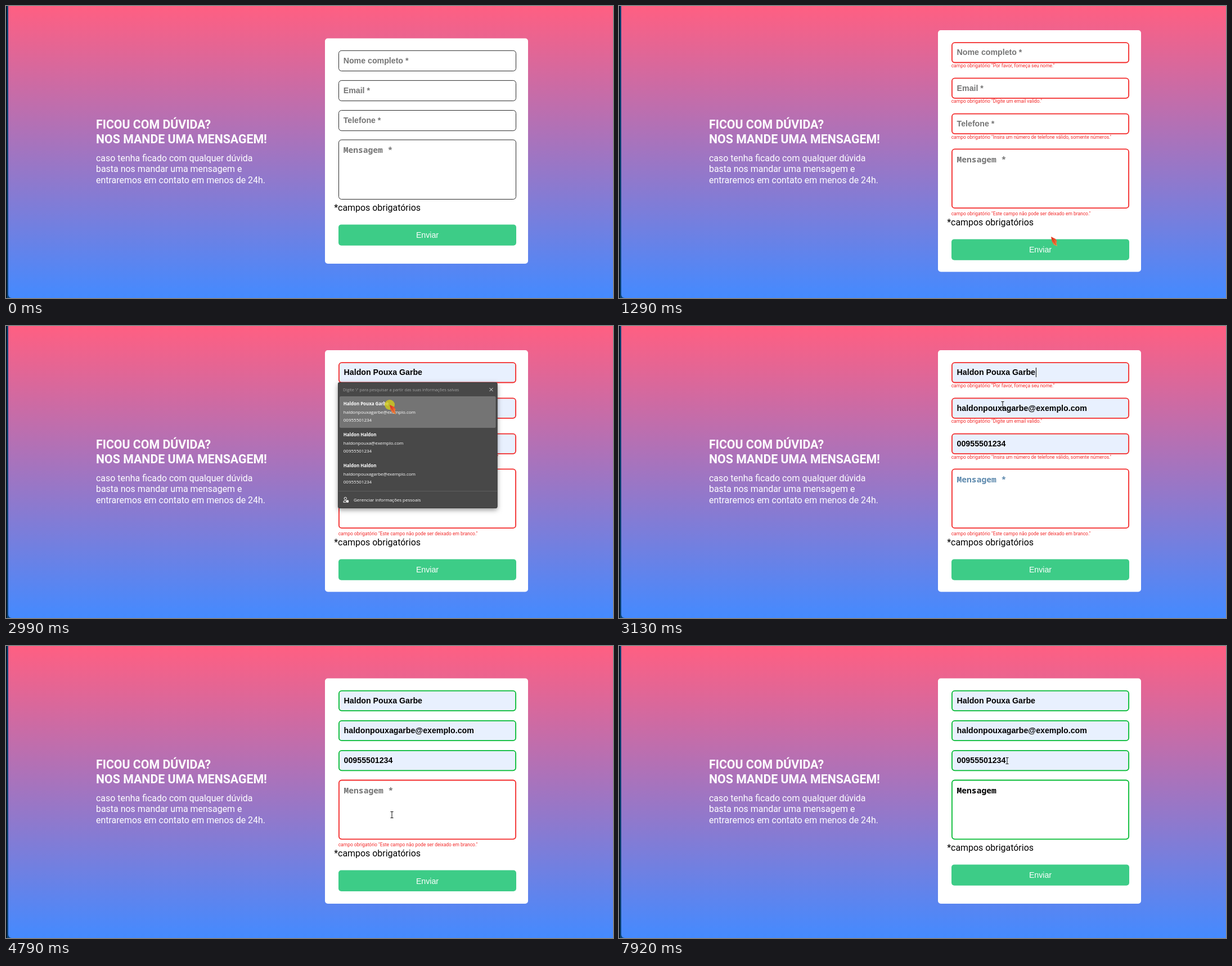
Recreate the animation shown at these times as an HTML page with a canvas. Size 1079 by 519 pixels, loop 8 s.

```html
<!DOCTYPE html>
<html lang="pt-BR">
<head>
<meta charset="utf-8">
<title>Formulário de contato</title>
<style>
html, body { margin: 0; width: 100%; height: 100%; overflow: hidden; background: #448aff; }
canvas { display: block; }
</style>
</head>
<body>
<canvas id="stage" width="1079" height="519"></canvas>
<script>
const ctx = document.getElementById('stage').getContext('2d');
const LOOP = 8000;

const ROBOTO = 'Roboto, sans-serif';
const ARIAL = '"Liberation Sans", Arial, sans-serif';
const FONT = {
  title: `bold 21.3px ${ROBOTO}`,
  body: `15.95px ${ROBOTO}`,
  error: `8.46px ${ROBOTO}`,
  input: `bold 14.18px ${ARIAL}`,
  button: `14.18px ${ARIAL}`,
  area: 'bold 14.6px "Noto Sans Mono", monospace',
  menu: '8px "Open Sans", sans-serif',
  menuBold: 'bold 7.9px "Open Sans", sans-serif',
  hint: '7.35px "Open Sans", sans-serif'
};
const RED = '#f32a2a', GREEN = '#04bb33', GRAY = '#757575', INK = '#000';

const NAME = 'Haldon Pouxa Garbe';
const MAIL = 'haldonpouxagarbe@exemplo.com';
const PHONE = '00955501234';

const FIELDS = [
  { hint: 'Nome completo *', value: NAME, error: 'Por favor, forneça seu nome.' },
  { hint: 'Email *', value: MAIL, error: 'Digite um email valido.' },
  { hint: 'Telefone *', value: PHONE, error: 'Insira um número de telefone válido, somente números.' }
];
const AREA_ERROR = 'Este campo não pode ser deixado em branco.';

// Form layouts; each holds from its start time on.
const LAYOUTS = [
  { from: 0, card: [57.5, 458], top: 78.8, pitch: 53.1, area: 237.4, note: 363.5, button: 388.4 },
  { from: 1290, card: [43, 472.5], top: 64.2, pitch: 63.3, area: 253.5, note: 389.7, button: 414.4, field: RED, text: RED },
  { from: 4310, card: [57.5, 458], top: 78.8, pitch: 53.1, area: 237.6, note: 373.9, button: 398.6, field: GREEN, text: RED },
  { from: 7020, card: [57.5, 458], top: 78.8, pitch: 53.1, area: 237.6, note: 363.5, button: 388.4, field: GREEN, text: GREEN }
];

// Pointer path: time, x, y
const PATH = [
  [470, 1019, 505], [1080, 768, 410], [1620, 768, 410], [2130, 674, 91],
  [2600, 674, 91], [2900, 682, 140], [3440, 682, 140], [3690, 800, 370],
  [3900, 822, 426], [4110, 798, 432], [4540, 798, 432], [4780, 686, 300],
  [6280, 686, 300], [6640, 746, 405], [6850, 751, 415], [7450, 751, 415],
  [7880, 690, 204]
];
const CLICKS = [[1150, 1290], [2160, 2300], [2920, 3130], [4180, 4310], [5000, 5140], [6890, 7020]];

const MENU = { open: 2300, close: 3130 };
const PASTE = 6350;

const within = (t, a, b) => t >= a && t < b;

function text(str, x, y, font, color, align = 'left') {
  ctx.font = font;
  ctx.fillStyle = color;
  ctx.textAlign = align;
  ctx.fillText(str, x, y);
}

function box(x, y, w, h, r, fill, stroke, line = 1) {
  ctx.beginPath();
  ctx.roundRect(x, y, w, h, r);
  if (fill) { ctx.fillStyle = fill; ctx.fill(); }
  if (stroke) { ctx.strokeStyle = stroke; ctx.lineWidth = line; ctx.stroke(); }
}

function rect(x, y, w, h, color) {
  ctx.fillStyle = color;
  ctx.fillRect(x, y, w, h);
}

function lines(color, width, ...segments) {
  ctx.strokeStyle = color;
  ctx.lineWidth = width;
  ctx.beginPath();
  for (const [x1, y1, x2, y2] of segments) { ctx.moveTo(x1, y1); ctx.lineTo(x2, y2); }
  ctx.stroke();
}

function drawPage() {
  rect(0, 0, 1079, 519, '#0b4275');
  rect(0, 0, 1.5, 519, '#03080f');
  const sky = ctx.createLinearGradient(0, 0, 0, 519);
  sky.addColorStop(0, '#ff5f82');
  sky.addColorStop(1, '#448aff');
  box(4, -10, 1090, 529, 6, sky);
  text('FICOU COM DÚVIDA?', 160, 218, FONT.title, '#fff');
  text('NOS MANDE UMA MENSAGEM!', 160, 243.5, FONT.title, '#fff');
  text('caso tenha ficado com qualquer dúvida', 160, 276, FONT.body, '#fff');
  text('basta nos mandar uma mensagem e', 160, 295.3, FONT.body, '#fff');
  text('entraremos em contato em menos de 24h.', 160, 314.6, FONT.body, '#fff');
}

function frame(y, h, color, fill) {
  const line = color ? 1.8 : 1;
  box(591 + line / 2, y + line / 2, 316 - line, h - line, 5, fill, color || '#2b2b2b', line);
}

const errorText = (msg, y) => text(`campo obrigatório "${msg}"`, 590.7, y, FONT.error, RED);

function drawForm(t, form, filled) {
  const [top, bottom] = form.card;
  box(567, top, 361, bottom - top, 5, '#fff');
  const x = form.field ? 600.6 : 599.7;

  FIELDS.forEach((f, i) => {
    const y = form.top + i * form.pitch;
    frame(y, 37.2, form.field, filled ? '#e8f0fe' : '#fff');
    text(filled ? f.value : f.hint, x, y + 23.2, FONT.input, filled ? INK : GRAY);
    if (form.field === RED) errorText(f.error, y + 44.7);
  });

  frame(form.area, 106.6, form.text, '#fff');
  const base = form.area + (form.text ? 24.6 : 23.8);
  if (t >= PASTE) text('Mensagem', x, base, FONT.area, INK);
  else text('Mensagem *', x, base, FONT.area, within(t, MENU.close, 4310) ? '#5d89ad' : GRAY);
  if (form.text === RED) errorText(AREA_ERROR, form.area + 118.5);

  text('*campos obrigatórios', 583.2, form.note, FONT.body, INK);
  box(591, form.button, 316, 37.4, 5, '#3dcc87');
  text('Enviar', 749, form.button + 24, FONT.button, '#fff', 'center');
}

function drawCarets(t, form) {
  if (within(t, MENU.open, 2640)) rect(601, 74, 1, 17, INK);
  if (within(t, MENU.close, 3620)) {
    ctx.font = FONT.input;
    rect(601.5 + ctx.measureText(NAME).width, 74, 1, 17, INK);
  }
  if (within(t, 5140, 5680) || within(t, 6210, 7020)) {
    rect(t < PASTE ? 601 : 670.5, form.area + 9.5, 1, 19, '#222');
  }
}

function drawMenu(hover) {
  ctx.save();
  ctx.shadowColor = 'rgba(0,0,0,.4)';
  ctx.shadowBlur = 8;
  ctx.shadowOffsetY = 3;
  box(590, 100, 283.5, 224, 3, '#484848');
  ctx.restore();
  box(590.5, 100.5, 282.5, 223, 3, null, '#3b3b3b');
  text("Digite '/' para pesquisar a partir das suas informações salvas", 599, 115.8, FONT.hint, '#a2a2a2');
  lines('#e8e8e8', 1, [859.5, 110, 865.5, 116], [865.5, 110, 859.5, 116]);
  if (hover) box(593, 125, 277.5, 56, 2, '#747474');

  const rows = [[NAME, MAIL], ['Haldon Haldon', 'haldonpouxa@exemplo.com'], ['Haldon Haldon', MAIL]];
  rows.forEach(([name, mail], i) => {
    const y = 141.3 + i * 55;
    text(name, 599.8, y, FONT.menuBold, '#fff');
    text(mail, 599.8, y + 14.2, FONT.menu, '#fff');
    text(PHONE, 599.8, y + 28.2, FONT.menu, '#fff');
  });

  lines('#5e5e5e', 1, [591, 293.5, 873, 293.5]);
  ctx.strokeStyle = '#fff';
  ctx.lineWidth = 1;
  ctx.beginPath();
  ctx.arc(603.3, 306.5, 2.2, 0, 7);
  ctx.moveTo(604, 313.5);
  ctx.lineTo(600, 313.5);
  ctx.quadraticCurveTo(599, 310.5, 602, 310.5);
  ctx.lineTo(604, 310.5);
  ctx.stroke();
  box(604.5, 309.5, 4.5, 4.2, 1, '#fff');
  text('Gerenciar informações pessoais', 618, 312, FONT.menu, '#fff');
}

function pointerAt(t) {
  let i = PATH.findIndex(p => p[0] > t);
  if (i < 0) return PATH[PATH.length - 1].slice(1);
  const [t0, x0, y0] = PATH[i - 1], [t1, x1, y1] = PATH[i];
  const u = (t - t0) / (t1 - t0), k = u * u * (3 - 2 * u);
  return [x0 + (x1 - x0) * k, y0 + (y1 - y0) * k];
}

function pointerKind(x, y, form, menu) {
  if (menu && y > 100 || x < 591 || x > 907) return 'arrow';
  if (within(y, form.button, form.button + 37.4)) return 'hand';
  if (within(y, form.area, form.note + 4)) return 'beam';
  const row = y - form.top;
  return row >= 0 && y < form.area && row % form.pitch < 37 ? 'beam' : 'arrow';
}

function shape(points, fill) {
  ctx.beginPath();
  points.forEach(([x, y]) => ctx.lineTo(x, y));
  ctx.closePath();
  ctx.fillStyle = fill;
  ctx.fill();
}

const POINTERS = {
  arrow() {
    const g = ctx.createLinearGradient(0, 0, 9, 17);
    g.addColorStop(0, '#e02a1c');
    g.addColorStop(.5, '#ee5a2c');
    g.addColorStop(1, '#f0a050');
    shape([[0, 0], [8, 4], [10.5, 8], [9.5, 11], [11, 17], [5, 14.5], [1.8, 9]], g);
    lines('#b8381c', .7, [2, 3, 9, 15]);
  },
  hand() {
    const g = ctx.createLinearGradient(0, 0, 0, 17);
    g.addColorStop(0, '#e8381c');
    g.addColorStop(1, '#f58220');
    shape([[-1.2, 0], [1, 0], [2, 5], [7.5, 6.5], [8.5, 9], [7, 13.5], [7, 16.5], [0, 17], [-1, 14], [-5, 9.5], [-4, 8], [-1, 10]], g);
    lines('#b8461a', .6, [3.2, 6, 3.5, 10], [5.6, 6.5, 5.7, 10]);
  },
  beam() {
    lines('#111', 1, [0, -5, 0, 5], [-2.5, -5.5, 2.5, -5.5], [-2.5, 5.5, 2.5, 5.5]);
  }
};

function drawPointer(t, x, y, kind) {
  if (CLICKS.some(([a, b]) => within(t, a, b))) {
    ctx.beginPath();
    ctx.arc(x, y, 9, 0, 7);
    ctx.fillStyle = 'rgba(214,206,24,.78)';
    ctx.fill();
  }
  ctx.save();
  ctx.translate(x, y);
  POINTERS[kind]();
  ctx.restore();
}

function render(t) {
  const form = LAYOUTS.filter(l => t >= l.from).pop();
  const menu = within(t, MENU.open, MENU.close);
  const pointer = t >= 470 && pointerAt(t);
  const hover = menu && pointer[1] > 125;
  drawPage();
  drawForm(t, form, hover || t >= MENU.close);
  drawCarets(t, form);
  if (menu) drawMenu(hover);
  if (pointer) drawPointer(t, ...pointer, pointerKind(...pointer, form, menu));
}

const start = performance.now();
function tick() {
  render((performance.now() - start) % LOOP);
  requestAnimationFrame(tick);
}
tick();
</script>
</body>
</html>
```
